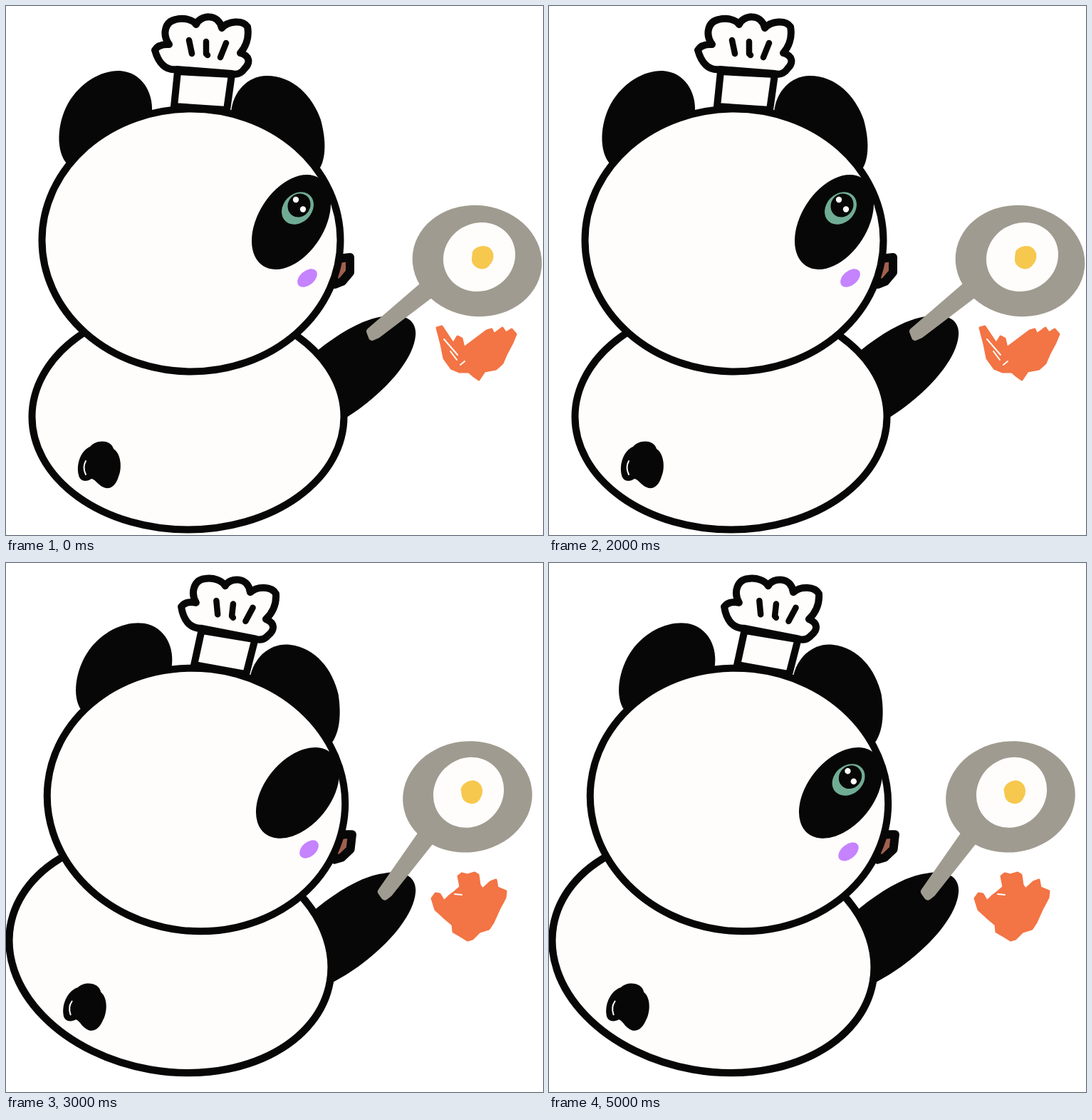
Write an HTML page that moves like this. It is 754 by 743 pixels and loops after 6000 ms.

```html
<!DOCTYPE html>
<html lang="en">
<head>
<meta charset="utf-8">
<title>Panda frying an egg</title>
<style>
  html, body { margin: 0; width: 100%; height: 100%; overflow: hidden; background: #fff; }
  svg { display: block; width: 754px; height: 743px; }
  .line { fill: #fefdfc; stroke: #070707; stroke-width: 10; stroke-linecap: round; stroke-linejoin: round; }
  .black { fill: #070707; }
  .white { fill: #fefdfc; }
  .flame { fill: #f37444; stroke: #f37444; stroke-width: 3; stroke-linejoin: round; }
  .scratch { fill: none; stroke: #fefdfc; stroke-width: 2; stroke-linecap: round; }
  .beak { fill: #a0604f; stroke-width: 12; }
  .handle { fill: #a09b90; stroke: #a09b90; stroke-width: 10; stroke-linejoin: round; }
</style>
</head>
<body>
<svg viewBox="0 0 754 743">
  <path class="black" d="M425 494C465 460 500 440 530 436C563 430 577 444 575 463C572 498 530 545 478 578L440 600Z"/>

  <g id="pan">
    <path class="handle" d="M584 394L511 457L514 465L521 462L600 402Z"/>
    <ellipse cx="661.5" cy="358" rx="91" ry="78" transform="rotate(7 661.5 358)" fill="#a09b90"/>
    <ellipse class="white" cx="664.5" cy="352.5" rx="51.5" ry="47.5" transform="rotate(-30 664.5 352.5)"/>
    <path d="M655 345Q660 337 671 337Q680 337 684 347Q686 357 679 364Q674 371 665 369Q653 365 654 354Z" fill="#f7c84e"/>
  </g>

  <g id="flameLow">
    <path class="flame" d="M605 452L612 450L620 462L628 474L634 464L640 467L643 480L655 471L675 456L682 454L685 461L697 452L702 459L710 454L716 461L711 473L703 488L697 502L688 510L672 513L664 525L657 520L650 514L637 514L625 509L615 495L611 475Z"/>
    <path class="scratch" d="M615 468L634 490M624 485L633 497M638 504L644 499"/>
  </g>
  <g id="flameHigh">
    <path class="flame" d="M598 471L603 464L609 465L615 475L622 468L630 462L638 455L635 440L640 436L648 438L658 435L663 438L665 452L669 458L680 448L688 445L690 456L702 461L701 470L693 485L684 505L678 514L665 518L655 528L648 530L640 525L628 518L627 508L614 497L603 487Z"/>
    <path class="scratch" d="M630 465L640 466"/>
  </g>

  <ellipse id="body" class="line" rx="219" ry="158.5"/>
  <g id="tail">
    <path class="black" d="M118 619C126 609 147 608 151 622C162 629 163 650 158 661C154 674 146 680 137 676C128 672 126 665 120 664C113 669 104 668 102 659C98 642 106 624 118 619Z"/>
    <path class="scratch" d="M112 639Q107 648 112 658"/>
  </g>

  <g id="head">
    <path class="black" d="M316 150C318 120 340 98 366 98C403 98 430 126 442 160C450 190 449 214 440 229L400 235Z"/>
    <path class="line beak" d="M455 358L474 354L483 353L483 374L472 387L462 391Z"/>
    <ellipse class="line" cx="260" cy="329" rx="209.5" ry="184.5"/>
    <path class="black" d="M86 222C70 205 71 166 87 137C105 106 135 90 160 91C190 93 207 120 205 150Q190 160 174 165Q155 173 142 182L122 194Z"/>
    <g class="line">
      <path d="M241 92L236 141L310 146L317 96Z"/>
      <path d="M240 89C224 91 214 80 209 62Q214 53 229 54C219 40 223 22 238 19C250 16 262 19 267 26C272 13 298 9 303 31C312 21 332 19 339 29C342 45 336 58 329 66C343 70 343 80 335 88Q328 98 317 95Z"/>
      <path stroke-width="8.5" fill="none" d="M257 48L261 67M281 50L281 67L283 69M309 52L301 72"/>
    </g>
    <ellipse class="black" cx="400.5" cy="303.5" rx="46.3" ry="73.2" transform="rotate(32.7 400.5 303.5)"/>
    <g id="eye">
      <ellipse cx="409.5" cy="284" rx="20" ry="25" transform="rotate(43 409.5 284)" fill="#70ac94"/>
      <ellipse class="black" cx="411.5" cy="280" rx="15.5" ry="17" transform="rotate(35 411.5 280)"/>
      <circle class="white" cx="407" cy="272" r="4.2"/>
      <circle class="white" cx="417" cy="285.5" r="4.2"/>
    </g>
  </g>
  <ellipse id="cheek" ry="10" fill="#c583ff"/>
</svg>
<script>
  const part = id => document.getElementById(id);
  const place = (id, transform) => part(id).setAttribute('transform', transform);
  const show = (id, visible) => part(id).setAttribute('visibility', visible ? 'visible' : 'hidden');

  const restPose = { body: 'translate(255.5 577)', head: '', pan: '', tail: '' };
  const tossPose = {
    body: 'translate(230.5 549) rotate(10) scale(1.04)',
    head: 'translate(7 3.5) rotate(6.4 260 329)',
    pan: 'translate(-13.5 -29.5) rotate(-14.4 661 358)',
    tail: 'translate(-20 -21.5) rotate(6 131 644)'
  };

  // Cheek for each second: x, y, length, tilt.
  const restCheek = [423, 382, 16, -40];
  const cheeks = [
    restCheek, [429.5, 402, 16.5, -33],
    restCheek, [425.5, 402, 15.5, -42],
    restCheek, [420.5, 405.5, 16.5, -40]
  ];

  function draw() {
    const second = Math.floor(performance.now() / 1000) % 6;
    const tossing = second % 2 === 1;
    const pose = tossing ? tossPose : restPose;
    for (const id in pose) place(id, pose[id]);
    show('flameLow', !tossing);
    show('flameHigh', tossing);
    show('eye', second !== 3);

    const [x, y, length, tilt] = cheeks[second];
    part('cheek').setAttribute('rx', length);
    place('cheek', `translate(${x} ${y}) rotate(${tilt})`);
    requestAnimationFrame(draw);
  }
  draw();
</script>
</body>
</html>
```
